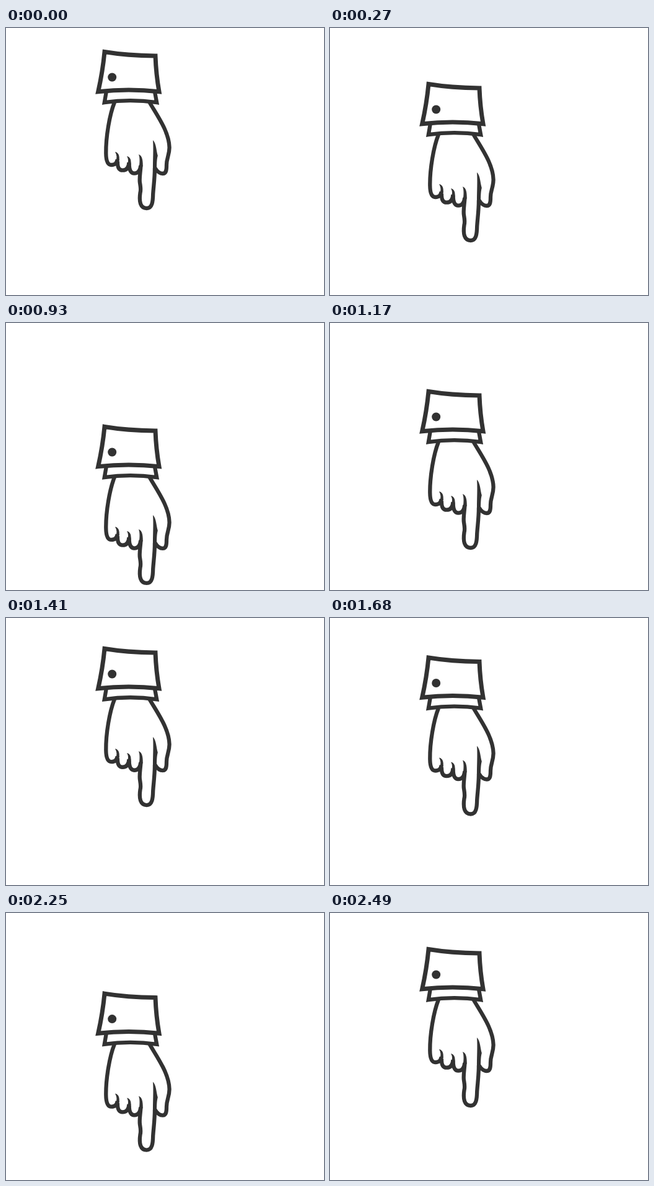
Write an HTML page that moves like this. It is 513 by 431 pixels and loops after 2520 ms.

```html
<!DOCTYPE html>
<html lang="en">
<head>
<meta charset="utf-8">
<title>Pointing hand</title>
<style>
html, body { margin: 0; width: 100%; height: 100%; overflow: hidden; background: #fff; }
svg { display: block; width: 513px; height: 431px; }
.line { fill: none; stroke: #323232; stroke-width: 6.3; stroke-miterlimit: 8; }
.ink { fill: #323232; }
</style>
</head>
<body>
<svg viewBox="0 0 513 431">
  <g id="hand">
    <g class="line">
      <path stroke-width="7" d="M159 38.5Q195 44.5 241 45Q242 74 247 102.7Q198 97.3 148.7 102.7Q156 70 159 38.5Z"/>
      <path d="M161.8 103L158.8 120.2Q200 114.2 243.2 120.2L240 103"/>
      <path d="M175 120C167 140 161 176 161.3 202C161.4 214 164 221 170 221C175 221 179 218.500 179.700 212"/>
      <path d="M180 215C179.500 226 183 229.700 188 229.700C194.500 229.700 198 225 198.500 217"/>
      <path d="M198.700 219C198.500 230 202 234.700 207 234.700C212.500 234.700 216.500 230 217.300 222"/>
      <path d="M217.500 222C216.500 236 214.800 243 216 250C217 256 218 261 216.500 266C214.500 280 216.500 291 227 291C236 291 237 280 237.200 268C238.200 254 240 242 240 226"/>
      <path d="M231.500 120C245 143 263.200 168 263.600 193C263.500 206 258.700 210 259 222C259 230 258 235 253 235C248 235 244 232 240.500 226"/>
    </g>
    <g class="ink">
      <circle cx="171.200" cy="79.500" r="7"/>
      <path d="M176 200C182 201 183.300 207 182.700 214L177 215C179.300 210 179 205 176 200Z"/>
      <path d="M195 207C200.500 208 202 213 201.600 219L196 220C197.500 215 197.500 211 195 207Z"/>
      <path d="M214 204C219.500 206 220.800 212 220.800 223L214.800 224C215.800 216 216 209 214 204Z"/>
      <path d="M237 181C242.500 186 242.500 199 244.800 206C243 213 243.200 220 243 230L237 230C236.800 215 238.200 195 237 181Z"/>
    </g>
  </g>
</svg>
<script>
const LOOP = 2520, STEP = 30;

// time (ms), drop (px), speed (px/ms)
const keys = [
  [0, 0, .06], [270, 52, .22], [540, 106, .17], [630, 118.5, .125],
  [830, 136, 0], [1080, 97.5, -.27], [1170, 72, -.285], [1530, 0, 0],
  [1620, 10, .21], [1680, 25.5, .3], [1980, 125, .24], [2050, 136, 0],
  [2160, 118, -.28], [2490, 20, -.27], [2520, 12, -.25]
];

// Cubic Hermite curve through the keys
function drop(t) {
  const i = keys.findIndex(k => k[0] > t);
  const [t0, y0, v0] = keys[i - 1], [t1, y1, v1] = keys[i];
  const d = t1 - t0, u = (t - t0) / d, w = 1 - u;
  return w * w * ((1 + 2 * u) * y0 + u * d * v0)
       + u * u * ((3 - 2 * u) * y1 - w * d * v1);
}

const hand = document.getElementById('hand');
const start = performance.now();

function draw() {
  const t = Math.max(0, performance.now() - start) % LOOP;
  const y = drop(Math.floor(t / STEP) * STEP);
  hand.setAttribute('transform', `translate(0 ${y.toFixed(2)})`);
  requestAnimationFrame(draw);
}
draw();
</script>
</body>
</html>
```
